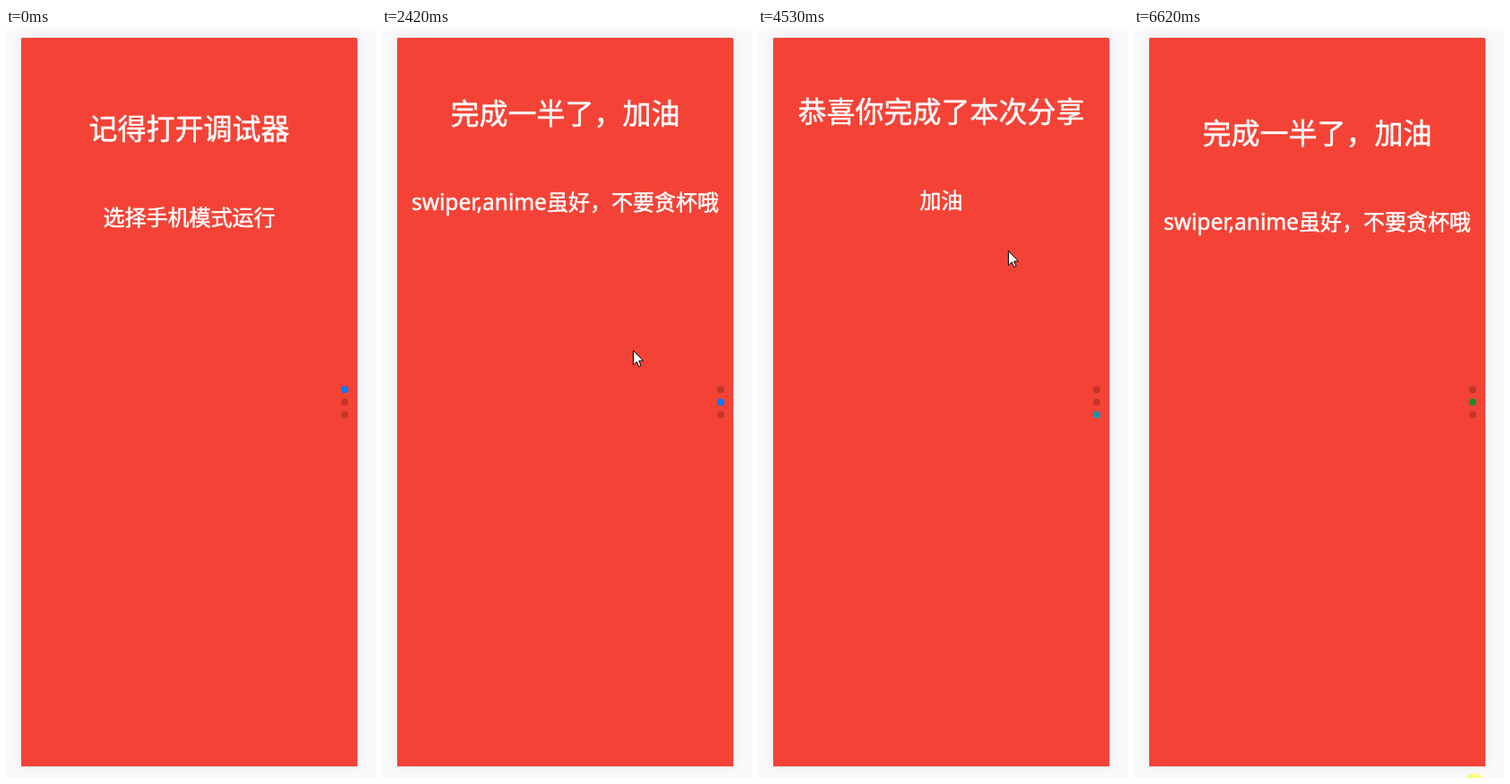
These frames come from a looping animation (413x836 px, 6740 ms). An HTML page:

```html
<!DOCTYPE html>
<html lang="zh-CN">
<head>
<meta charset="utf-8">
<title>Vertical swiper</title>
<style>
html, body { margin: 0; width: 100%; height: 100%; overflow: hidden; background: #fafafa; }
#stage { position: relative; width: 413px; height: 836px; overflow: hidden; background: #fafafa; }
#phone {
  position: absolute; left: 17px; top: 11px; width: 375px; height: 812px;
  background: #f44336; box-shadow: 0 0 16px rgba(0, 0, 0, .07), 0 0 1px rgba(0, 0, 0, .3);
}
svg { position: absolute; left: 0; top: 0; }
text {
  fill: #fff; stroke: #fff; stroke-width: .5px; text-anchor: middle;
  font-family: "Noto Sans", "Noto Sans CJK SC", "Noto Sans CJK", sans-serif;
}
.title { font-size: 32px; }
.sub { font-size: 24px; }
.latin { font-size: 24.5px; }
</style>
</head>
<body>
<div id="stage">
  <div id="phone"></div>
  <svg width="413" height="836" viewBox="0 0 413 836">
    <clipPath id="screen"><rect x="17" y="11" width="375" height="812"/></clipPath>
    <g clip-path="url(#screen)">
      <g class="slide">
        <text class="title" x="204.5" y="124">记得打开调试器</text>
        <text class="sub" x="204.5" y="220">选择手机模式运行</text>
      </g>
      <g class="slide">
        <text class="title" x="204.5" y="124">完成一半了，加油</text>
        <text class="sub" x="204.5" y="220"><tspan class="latin">swiper,anime</tspan>虽好，不要贪杯哦</text>
      </g>
      <g class="slide">
        <text class="title" x="204.5" y="124">恭喜你完成了本次分享</text>
        <text class="sub" x="204.5" y="220">加油</text>
      </g>
    </g>
    <circle class="dot" cx="378" cy="403" r="4"/>
    <circle class="dot" cx="378" cy="417" r="4"/>
    <circle class="dot" cx="378" cy="431" r="4"/>
    <g id="pointer">
      <path d="M.5 .5V16.5L4.3 13L6.8 18.5L9.2 17.5L6.8 12H11.6Z" fill="#fff" stroke="#000"/>
      <circle id="press" r="12" fill="#ff0" fill-opacity=".5"/>
    </g>
  </svg>
</div>
<script>
const LOOP = 6740;
const BEAT = 110.6, FIRST = 82;   // screen refresh, in ms
const DROP = 800, DROP_MS = 1000, DROP_DELAY = 630;

// Each swipe: beat of the press, time of release, slide it brings, colour of its dot
const SWIPES = [
  { press: 8, release: 1235, slide: 1, dot: '#007aff' },
  { press: 28, release: 3346, slide: 2, dot: '#1a93ad' },
  { press: 44, release: 5271, slide: 1, dot: '#1f8b26' },
  { press: 59, release: LOOP, slide: 0, dot: '#007aff' }
];
const OPENING = { release: -LOOP, slide: 0, dot: '#007aff' };

// Where the pointer comes to rest or turns: beat, x, y
const STOPS = [
  [-1, 350, 860], [0, 323, 784], [6, 229, 537], [8, 229, 537], [11, 219, 78],
  [21, 280, 359], [28, 318, 439], [31, 372, 36], [33, 384, 115], [34, 384, 115],
  [36, 289, 250], [44, 268, 246], [47, 262, 723], [51, 312, 792], [53, 312, 792],
  [54, 380, 860], [59, 380, 843]
];

const slides = [...document.querySelectorAll('.slide')];
const dots = [...document.querySelectorAll('.dot')];
const pointer = document.getElementById('pointer');
const press = document.getElementById('press');

const move = (el, x, y) => el.setAttribute('transform', `translate(${x} ${y})`);
const show = (el, on) => el.setAttribute('visibility', on ? 'visible' : 'hidden');
const easeInOut = k => k < .5 ? 4 * k ** 3 : 1 - 4 * (1 - k) ** 3;

function pointAt(beat) {
  const i = STOPS.findIndex(s => s[0] > beat);
  if (i < 1) return STOPS.at(i).slice(1);
  const [a, b] = [STOPS[i - 1], STOPS[i]];
  const k = easeInOut((beat - a[0]) / (b[0] - a[0]));
  return [1, 2].map(j => Math.round(a[j] + (b[j] - a[j]) * k));
}

// Elastic fall from above, expressed as the distance left
function dropAt(ms) {
  const k = ms / DROP_MS;
  if (k <= 0) return -DROP;
  return k >= 1 ? 0 : -DROP * 2 ** (-10 * k) * Math.cos(4 * Math.PI * k);
}

function draw(time) {
  const beat = Math.floor((time - FIRST) / BEAT);
  const t = FIRST + beat * BEAT;
  const scene = SWIPES.findLast(s => s.release <= t) || OPENING;
  const held = SWIPES.find(s => beat >= s.press && t < s.release);
  const [x, y] = pointAt(beat);
  const drag = held ? y - pointAt(held.press)[1] : 0;

  slides.forEach((el, i) => show(el, i === scene.slide));
  move(slides[scene.slide], 0, Math.round(dropAt(t - scene.release - DROP_DELAY) + drag));
  dots.forEach((el, i) => {
    const on = i === scene.slide;
    el.setAttribute('fill', on ? scene.dot : '#000');
    el.setAttribute('fill-opacity', on ? 1 : .2);
  });
  move(pointer, x, y);
  show(press, held);
}

const start = performance.now();
function loop() {
  draw((performance.now() - start) % LOOP);
  requestAnimationFrame(loop);
}
loop();
</script>
</body>
</html>
```
